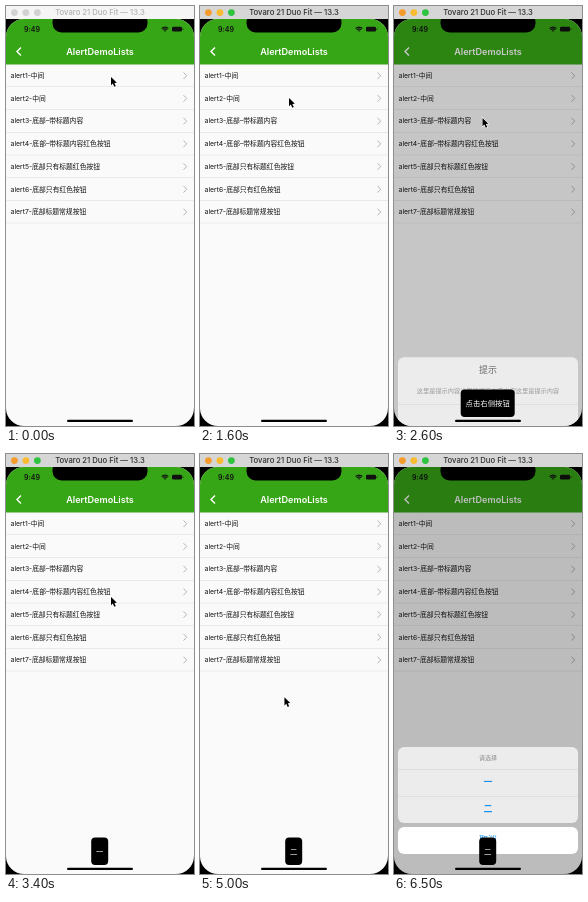
Animation, 188 px wide and 420 px high, one loop 6600 ms. Source, as an HTML page with a canvas:

```html
<!DOCTYPE html>
<html lang="zh-CN">
<head>
<meta charset="utf-8">
<title>AlertDemoLists</title>
<style>
  html, body { margin: 0; width: 100%; height: 100%; overflow: hidden; background: #000; }
  canvas { display: block; width: 188px; height: 420px; }
</style>
</head>
<body>
<canvas id="stage"></canvas>
<script>
const W = 188, H = 420, LOOP = 6600, BAR = 13;
const LIST_TOP = 58.4, ROW = 22.7;
const RISE = 150, FALL = 110, TOAST_TIME = 680, DIM = 0.25;
const BLUE = '#1a93f0', RED = '#f0463c';
const FONT = 'Inter, "Noto Sans CJK SC", "Noto Sans CJK", sans-serif';
const MESSAGE = '这里是提示内容这里是提示内容内容这里是提示内容';

const rows = ['alert1-中间', 'alert2-中间', 'alert3-底部–带标题内容', 'alert4-底部–带标题内容红色按钮',
  'alert5-底部只有标题红色按钮', 'alert6-底部只有红色按钮', 'alert7-底部标题常规按钮'];

const dialogs = [
  { open: 900, close: 1380, buttons: ['确定'] },
  { open: 1680, close: 2200, buttons: ['取消', '确定'], toast: '点击右侧按钮' }
];
const sheets = [
  { open: 2528, close: 2980, title: '提示', message: MESSAGE, toast: '一' },
  { open: 3460, close: 3940, title: '提示', message: MESSAGE, red: true, toast: '二' },
  { open: 4395, close: 4840, title: '请选择', red: true, toast: '二' },
  { open: 5240, close: 5860, red: true, toast: '二' },
  { open: 6260, close: LOOP + 400, title: '请选择' }
];
const alerts = [...dialogs, ...sheets];

// time, x, y of the pointer tip
const pointer = [
  [920, 105, 71], [1180, 96, 243], [1380, 96, 243], [1580, 89, 92], [1700, 89, 92],
  [2000, 124, 243], [2220, 124, 243], [2440, 88.5, 112], [2620, 88.5, 112],
  [2820, 92, 328], [2990, 92, 328], [3280, 105, 143], [3480, 105, 143],
  [3740, 91, 355], [3950, 91, 355], [4240, 76, 163], [4430, 76, 163],
  [4680, 89, 355], [4850, 89, 355], [5100, 82, 184], [5260, 82, 184],
  [5500, 89.5, 356], [5870, 89.5, 356], [6120, 80, 204], [6290, 80, 204], [6460, 92, 389]
];

const canvas = document.getElementById('stage');
const ctx = canvas.getContext('2d');
const scale = window.devicePixelRatio || 1;
canvas.width = W * scale;
canvas.height = H * scale;

const clamp = v => Math.max(0, Math.min(1, v));
const smooth = v => { v = clamp(v); return v * v * (3 - 2 * v); };
const presence = (t, item) =>
  t < item.close ? smooth((t - item.open) / RISE) : 1 - smooth((t - item.close) / FALL);

function box(x, y, w, h, color, radius = 0) {
  ctx.fillStyle = color;
  ctx.beginPath();
  ctx.roundRect(x, y, w, h, radius);
  ctx.fill();
}

function label(text, x, y, size, color, align = 'center', weight = 400) {
  ctx.font = `${weight} ${size}px ${FONT}`;
  ctx.textAlign = align;
  ctx.textBaseline = 'middle';
  ctx.fillStyle = color;
  ctx.fillText(text, x, y);
}

function line(points, color, width) {
  ctx.strokeStyle = color;
  ctx.lineWidth = width;
  ctx.beginPath();
  points.forEach(([x, y]) => ctx.lineTo(x, y));
  ctx.stroke();
}

function drawTitleBar(active) {
  box(0, 0, W, BAR, active ? '#d6d6d6' : '#f5f5f5');
  const lights = active ? ['#f59b2c', '#f9bc30', '#2ec440'] : ['#d2d2d2', '#d2d2d2', '#d2d2d2'];
  lights.forEach((color, i) => box(5 + 11.5 * i, 3.2, 6.8, 6.8, color, 3.4));
  label('Tovaro 21 Duo Fit — 13.3', 94, 7, 7.7, active ? '#2c2c2c' : '#b0b0b0', 'center', 500);
}

function drawList() {
  box(0, BAR, W, H - BAR, '#fafafa');
  box(0, BAR, W, LIST_TOP - BAR, '#37a616');
  label('AlertDemoLists', 94, 46, 9.1, '#fff', 'center', 600);
  line([[15, 41.5], [11, 45.5], [15, 49.5]], '#fff', 1.4);
  rows.forEach((text, i) => {
    const y = LIST_TOP + ROW * (i + 0.5);
    label(text, 4.6, y + 0.3, 6.8, '#111', 'left');
    line([[177.5, y - 3.3], [180.7, y], [177.5, y + 3.3]], '#b5b5b5', 1);
    box(0, y + ROW / 2 - 0.5, W, 0.5, '#dcdcdc');
  });
}

function drawStatus() {
  label('9:49', 26, 23.4, 7, '#111', 'center', 600);
  ctx.strokeStyle = '#111';
  ctx.lineWidth = 1.2;
  [1.2, 3, 4.8].forEach(r => {
    ctx.beginPath();
    ctx.arc(159, 26, r, -Math.PI * 0.75, -Math.PI * 0.25);
    ctx.stroke();
  });
  box(166, 20.8, 10, 4.8, '#111', 1.3);
  box(176.6, 22.3, 0.8, 1.8, '#111', 0.4);
  box(46.5, BAR - 6, 95, 19.5, '#000', 9);
}

function drawDialog(dialog, t) {
  const p = presence(t, dialog);
  if (!p) return;
  const w = 122.6, h = 66, x = 94 - w / 2, y = 184;
  ctx.save();
  ctx.globalAlpha = p;
  if (t < dialog.close) {
    const zoom = 1.15 - 0.15 * p;
    ctx.translate(94, y + h / 2);
    ctx.scale(zoom, zoom);
    ctx.translate(-94, -y - h / 2);
  }
  box(x, y, w, h, '#f4f4f4', 6);
  label('提示', 94, y + 13, 8, '#111', 'center', 600);
  label('这里是提示内容', 94, y + 28, 6.2, '#333');
  box(x, y + 46, w, 0.5, '#cfcfcf');
  const cell = w / dialog.buttons.length;
  dialog.buttons.forEach((text, i) => {
    if (i) box(x + cell * i, y + 46, 0.5, 20, '#cfcfcf');
    label(text, x + cell * (i + 0.5), y + 56.5, 7.8, BLUE);
  });
  ctx.restore();
}

function drawSheet(sheet, t) {
  const p = presence(t, sheet);
  if (!p) return;
  const header = sheet.message ? 47 : sheet.title ? 22 : 0;
  const top = 315 - header;
  ctx.save();
  ctx.translate(0, (1 - p) * (428 - top));
  box(4, top, 180, 369 - top, '#ececec', 6);
  if (sheet.message) {
    label(sheet.title, 94, top + 13.5, 9, '#6c6c6c', 'center', 500);
    label(sheet.message, 94, top + 34, 6.2, '#999');
  } else if (sheet.title) {
    label(sheet.title, 94, top + 11, 6, '#8c8c8c');
  }
  if (header) box(4, 315, 180, 0.5, '#d4d4d4');
  box(4, 342, 180, 0.5, '#d4d4d4');
  label('一', 94, 328.5, 9, BLUE, 'center', 700);
  label(sheet.red ? '删除' : '二', 94, 355.5, 9, sheet.red ? RED : BLUE, 'center', sheet.red ? 400 : 700);
  box(4, 373, 180, 27, '#fff', 6);
  label('取消', 94, 386.5, 9, BLUE, 'center', 500);
  ctx.restore();
}

function drawToast(t) {
  const source = alerts.find(({ toast, close }) => toast && t >= close && t < close + TOAST_TIME);
  if (!source) return;
  const w = source.toast.length * 7.4 + 9.6;
  box(93.7 - w / 2, 383.5, w, 27.5, '#000', 4);
  label(source.toast, 93.7, 397.3, 7.4, '#fff', 'center', 500);
}

function drawPointer(t) {
  if (t >= 6450) return;
  const next = pointer.findIndex(key => key[0] > t);
  const b = pointer[next];
  const a = pointer[Math.max(0, next - 1)];
  const p = a === b ? 0 : smooth((t - a[0]) / (b[0] - a[0]));
  ctx.save();
  ctx.translate(a[1] + (b[1] - a[1]) * p, a[2] + (b[2] - a[2]) * p);
  ctx.scale(0.93, 0.93);
  ctx.beginPath();
  [[0, 0], [0, 8.8], [2, 7], [3.5, 10.4], [5.1, 9.7], [3.6, 6.4], [6.3, 6.2]]
    .forEach(([x, y]) => ctx.lineTo(x, y));
  ctx.closePath();
  ctx.strokeStyle = '#fff';
  ctx.lineWidth = 1.2;
  ctx.stroke();
  ctx.fillStyle = '#000';
  ctx.fill();
  ctx.restore();
}

function draw(t) {
  ctx.setTransform(scale, 0, 0, scale, 0, 0);
  box(0, 0, W, H, '#000');
  drawTitleBar(t >= 900);
  ctx.save();
  ctx.beginPath();
  ctx.roundRect(0, BAR, W, H - BAR, 18);
  ctx.clip();
  drawList();
  drawStatus();
  // the backdrop darkens well ahead of the sliding sheet
  const dim = Math.max(...alerts.map(item => presence(t, item))) ** 0.25;
  box(0, BAR, W, H - BAR, `rgba(0,0,0,${DIM * dim})`);
  dialogs.forEach(item => drawDialog(item, t));
  sheets.forEach(item => drawSheet(item, t));
  drawToast(t);
  box(61, 413.8, 66, 2.3, '#000', 1.2);
  ctx.restore();
  drawPointer(t);
}

const start = performance.now();
function tick() {
  draw((performance.now() - start) % LOOP);
  requestAnimationFrame(tick);
}
tick();
</script>
</body>
</html>
```
